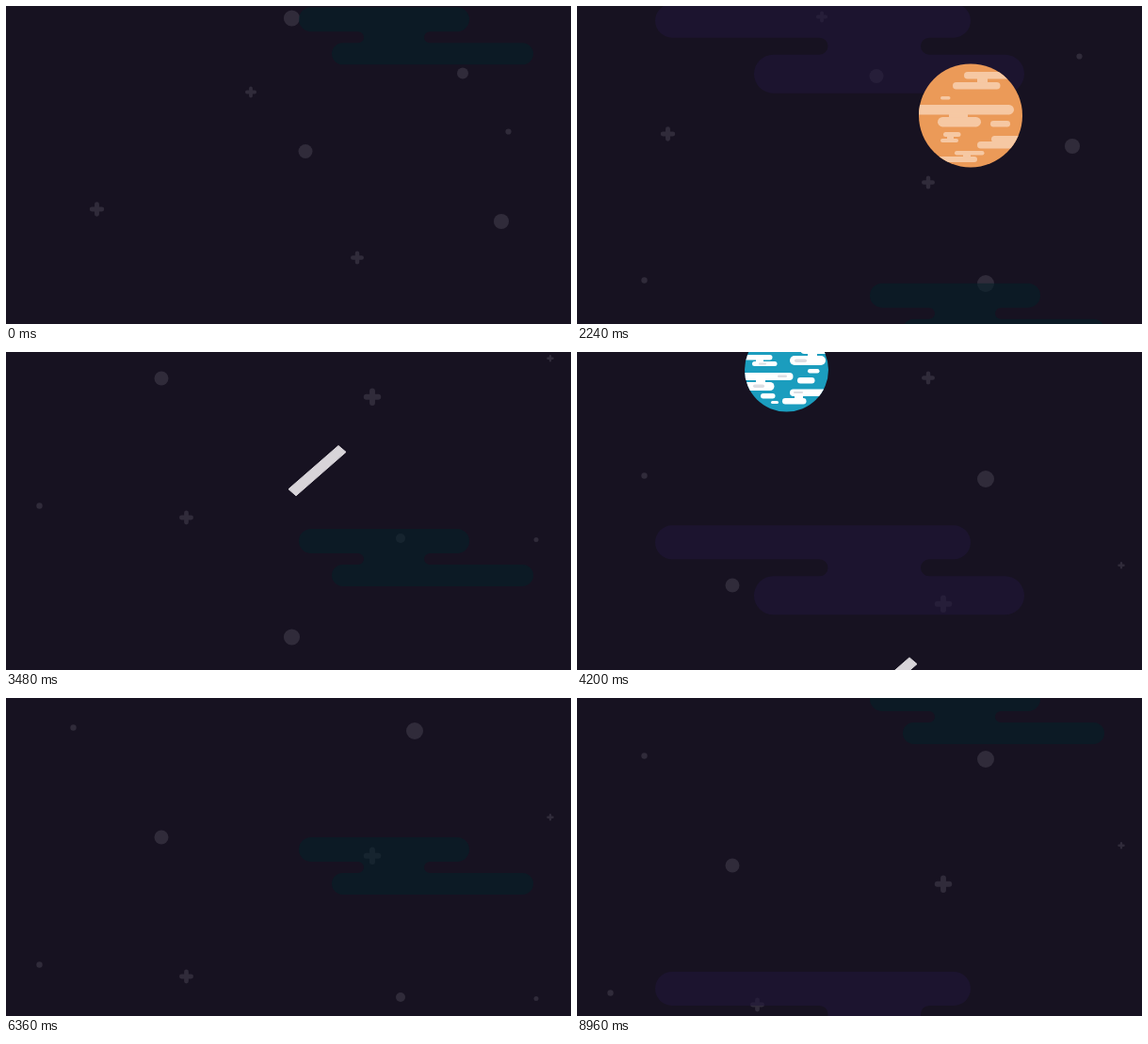
An HTML page for the animation above (9000 ms loop, 600 px wide and 338 px high).

```html
<!DOCTYPE html>
<html lang="en">
<head>
<meta charset="utf-8">
<title>Drifting through space</title>
<style>
  html, body { margin: 0; width: 100%; height: 100%; overflow: hidden; background: #171221; }
  svg { display: block; width: 100vw; height: 100vh; }
  .stars { fill: #302b3a; stroke: #302b3a; stroke-linecap: round; }
  .stars circle { stroke: none; }
  #teal { fill: rgba(5, 33, 41, .6); }
  #purple { fill: rgba(33, 23, 58, .6); }
  #orange { fill: #eb9a58; }
  #orange .bands { fill: #f6c8a3; }
  #blue { fill: #1b9dbe; }
  #blue .bands { fill: #fff; }
  #blue .marks { fill: #dcdde2; }
  #rod { fill: #d8d4d9; stroke: #d8d4d9; stroke-linejoin: round; }
</style>
</head>
<body>
<svg viewBox="0 0 600 338" preserveAspectRatio="none">
  <defs>
    <clipPath id="orangeClip"><circle r="55"/></clipPath>
    <clipPath id="blueClip"><circle r="44.5"/></clipPath>
  </defs>
  <g class="stars" id="stars"></g>
  <path id="teal" d="M324 0H479a13 13 0 0 1 0 26H450a6 6 0 0 0 0 12H548.5a11.5 11.5 0 0 1 0 23H357.5a11.5 11.5 0 0 1 0-23H374a6 6 0 0 0 0-12H324a13 13 0 0 1 0-26z"/>
  <path id="purple" d="M101 0H400a18 18 0 0 1 0 36H374a9 9 0 0 0 0 18H454.5a20.5 20.5 0 0 1 0 41H208.5a20.5 20.5 0 0 1 0-41H257.5a9 9 0 0 0 0-18H101a18 18 0 0 1 0-36z"/>
  <path id="rod" d="M353 .8L361 7.6L308 54L300 47z"/>
  <g id="orange"><circle r="55"/><g class="bands" clip-path="url(#orangeClip)"></g></g>
  <g id="blue"><circle r="44.5"/><g clip-path="url(#blueClip)"><g class="bands"></g><g class="marks"></g></g></g>
</svg>
<script>
  const LOOP = 9000, FRAME = 40, STEPS_PER_MS = 0.03;
  const $ = s => document.querySelector(s);
  const mod = (a, n) => ((a % n) + n) % n;

  function add(parent, tag, attrs) {
    const el = document.createElementNS('http://www.w3.org/2000/svg', tag);
    for (const k in attrs) el.setAttribute(k, attrs[k]);
    parent.appendChild(el);
    return el;
  }
  const place = (el, x, y) => el.setAttribute('transform', `translate(${x} ${y})`);

  // x, y, radius
  const dots = [
    [303.5, 13, 8.6], [485, 71.5, 6], [533.5, 133.5, 3.1], [318, 154.5, 7.5], [526, 229, 8.1],
    [419, -92, 5], [563, -90.5, 2.5], [71.5, -378.5, 3.2], [434, -375, 9],
    [165, -262, 7.5], [35.5, -126.5, 3.2]
  ];
  // x, y, overall size
  const crosses = [
    [260, 91.5, 12], [96.5, 216, 15.5], [373, 267.5, 14], [389, -242.3, 18.5],
    [578, -283.3, 7.5], [191.5, -114, 15]
  ];
  const stars = [
    ...dots.map(([x, y, r]) => ({ x, y, el: add($('#stars'), 'circle', { r }) })),
    ...crosses.map(([x, y, size]) => {
      const w = size * 0.32, a = (size - w) / 2;
      const d = `M${-a} 0H${a}M0 ${-a}V${a}`;
      return { x, y, el: add($('#stars'), 'path', { d, 'stroke-width': w }) };
    })
  ];

  // Bands: left, top, right, bottom, with pill ends unless square is set
  function bands(target, cx, cy, list, square) {
    for (const [l, t, r, b] of list) {
      add($(target), 'rect', {
        x: l - cx, y: t - cy, width: r - l, height: b - t,
        rx: square ? 0 : (b - t) / 2
      });
    }
  }
  bands('#orange .bands', 418, 290.5, [
    [411, 244, 480, 251.5], [399, 255, 449.5, 262.5], [386, 270, 396.5, 273.5],
    [355, 279, 464, 289.5], [383, 292, 429, 302.5], [439, 296, 460, 302.5],
    [440, 312, 480, 319], [425, 318, 480, 325.5], [389, 308, 407.5, 313],
    [386, 315, 405, 319], [401, 328, 432.5, 332.5], [380, 334, 425, 340]
  ]);
  bands('#orange .bands', 418, 290.5, [
    [425, 251, 436, 256], [395, 289, 415, 293], [393, 312, 400, 316], [410, 332, 418, 335]
  ], true);
  bands('#blue .bands', 222.5, 316, [
    [190, 277, 219, 283.5], [231, 280, 239, 283.5], [175, 286, 211, 293.5],
    [219, 290, 231.5, 294.5], [237, 290, 275, 299], [226, 301, 264, 311],
    [170, 300, 207.5, 305.5], [186, 307, 212.5, 312], [245, 315, 257.5, 319.5],
    [170, 319, 229.5, 327], [234, 324, 252.5, 330.5], [170, 329, 209.5, 338],
    [226, 336.5, 275, 344], [195, 341, 210.5, 346.5], [218, 346, 243.5, 352.5],
    [206, 349, 214, 352]
  ]);
  bands('#blue .bands', 222.5, 316, [
    [196, 283, 205, 287], [245, 298, 255, 302], [190, 305, 198, 308],
    [190, 326, 200, 330], [231, 343, 240, 347]
  ], true);
  bands('#blue .marks', 222.5, 316, [
    [196, 289, 204, 292], [231, 304.5, 244, 308], [193, 308.5, 201, 310.5],
    [213, 321.5, 223, 324], [187, 331.5, 199, 335], [230, 339, 240, 341]
  ]);

  function draw(time) {
    const frame = Math.floor((time % LOOP) / FRAME + 0.01);
    const step = Math.round(frame * FRAME * STEPS_PER_MS);

    for (const s of stars) place(s.el, s.x, mod(s.y + 10 * step + 40, 750) - 40);

    const drift = step * 600 / 45;
    place($('#teal'), 0, mod(1.3 + drift + 150, 600) - 150);
    place($('#purple'), 0, mod(-295.7 + drift + 150, 600) - 150);
    // The purple cloud first enters from the top
    $('#purple').style.visibility = step < 15 ? 'hidden' : 'visible';

    const fall = 10.24 * (step % 225);
    place($('#orange'), 418, fall - 569.7);
    place($('#blue'), 222.5, fall - 1271.2);
    place($('#rod'), 0, fall - 966.2);
  }

  const start = performance.now();
  function tick() {
    draw(performance.now() - start);
    requestAnimationFrame(tick);
  }
  tick();
</script>
</body>
</html>
```
